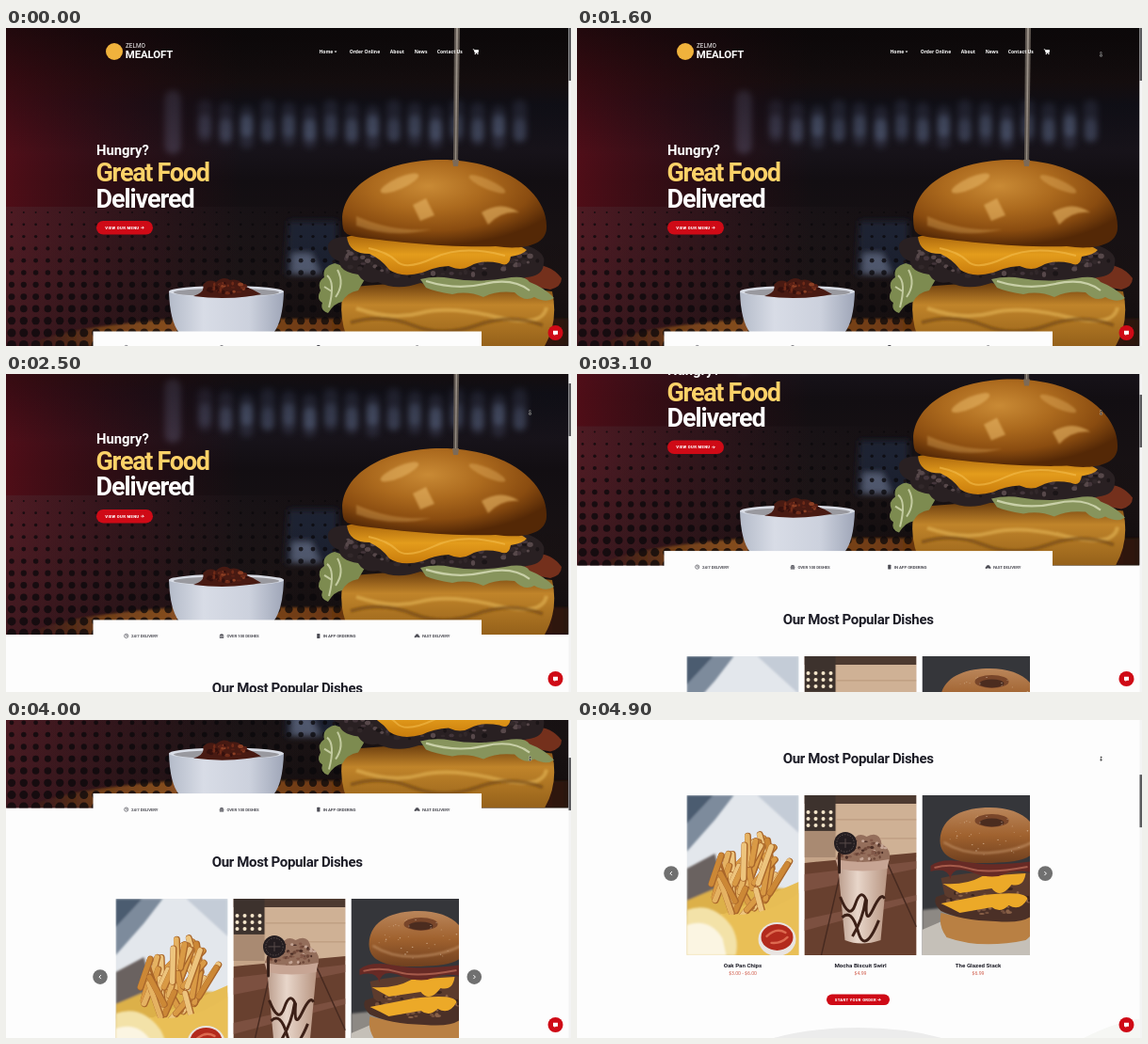
An HTML page that plays this animation: 600x338 px, repeating every 5000 ms.

```html
<!DOCTYPE html>
<html lang="en">
<head>
<meta charset="utf-8">
<title>Food delivery page</title>
<style>
html, body { margin: 0; width: 100%; height: 100%; overflow: hidden; background: #fdfdfd; }
svg { display: block; width: 100vw; height: 100vh; }
text { font-family: Roboto, Inter, sans-serif; font-weight: 700; }
.open { font-family: "Open Sans", "Noto Sans", sans-serif; }
.mid { text-anchor: middle; }
</style>
</head>
<body>
<svg viewBox="0 0 600 338">
<defs>
  <linearGradient id="wall" x2="0" y2="1">
    <stop offset="0" stop-color="#0e0a0b"/><stop offset=".17" stop-color="#1a1112"/>
    <stop offset=".24" stop-color="#11111a"/><stop offset=".38" stop-color="#17131a"/>
    <stop offset=".48" stop-color="#120e12"/><stop offset=".8" stop-color="#1a1314"/><stop offset="1" stop-color="#160f10"/>
  </linearGradient>
  <linearGradient id="glow">
    <stop offset="0" stop-color="#5e0d18" stop-opacity=".8"/><stop offset=".14" stop-color="#4c0c16" stop-opacity=".6"/>
    <stop offset=".42" stop-color="#3a0c14" stop-opacity="0"/>
  </linearGradient>
  <linearGradient id="shade" x2="0" y2="1">
    <stop offset="0" stop-color="#0a0708" stop-opacity=".65"/><stop offset=".4" stop-color="#0a0708" stop-opacity="0"/>
    <stop offset=".65" stop-color="#0a0708" stop-opacity="0"/><stop offset="1" stop-color="#0a0708" stop-opacity=".3"/>
  </linearGradient>
  <linearGradient id="haze">
    <stop offset="0" stop-color="#4d3a40" stop-opacity=".5"/><stop offset="1" stop-color="#30242a" stop-opacity="0"/>
  </linearGradient>
  <linearGradient id="wood">
    <stop offset="0" stop-color="#5a2f14" stop-opacity="0"/><stop offset=".14" stop-color="#6e3d18"/>
    <stop offset=".3" stop-color="#8a5122"/><stop offset=".55" stop-color="#6b3812"/><stop offset="1" stop-color="#2b150b"/>
  </linearGradient>
  <linearGradient id="bowl">
    <stop offset="0" stop-color="#b4bbc9"/><stop offset=".3" stop-color="#d8dce6"/><stop offset=".7" stop-color="#ccd1dd"/><stop offset="1" stop-color="#9fa6b8"/>
  </linearGradient>
  <radialGradient id="bun" cx=".42" cy=".3" r=".68">
    <stop offset="0" stop-color="#c98a35"/><stop offset=".4" stop-color="#ac6a1e"/>
    <stop offset=".75" stop-color="#8a4c10"/><stop offset="1" stop-color="#542806"/>
  </radialGradient>
  <linearGradient id="base" x2="0" y2="1">
    <stop offset="0" stop-color="#6b3d0e"/><stop offset=".35" stop-color="#c0842a"/><stop offset="1" stop-color="#95611a"/>
  </linearGradient>
  <linearGradient id="cheese" x2="0" y2="1">
    <stop offset="0" stop-color="#a8640c"/><stop offset=".5" stop-color="#e39c1c"/><stop offset="1" stop-color="#c97c0c"/>
  </linearGradient>
  <linearGradient id="glass">
    <stop offset="0" stop-color="#b99b8a"/><stop offset=".4" stop-color="#e8d6ca"/><stop offset="1" stop-color="#b6937f"/>
  </linearGradient>
  <linearGradient id="donut" x2="0" y2="1">
    <stop offset="0" stop-color="#ba865b"/><stop offset=".5" stop-color="#a0622f"/><stop offset="1" stop-color="#70401f"/>
  </linearGradient>
  <filter id="soft" x="-50%" y="-50%" width="200%" height="200%"><feGaussianBlur stdDeviation="3"/></filter>
  <filter id="soft1" x="-20%" y="-20%" width="140%" height="140%"><feGaussianBlur stdDeviation="1.2"/></filter>
  <clipPath id="heroClip"><rect width="597.5" height="338"/></clipPath>
  <clipPath id="card"><rect width="119" height="170"/></clipPath>
  <clipPath id="cardCut"><rect width="114.5" height="170"/></clipPath>
</defs>

<rect width="600" height="338" fill="#fdfdfd"/>
<g id="page">
  <g clip-path="url(#heroClip)">
    <rect width="598" height="338" fill="url(#wall)"/>
    <g id="bottles" fill="#7484a8" filter="url(#soft)"/>
    <g filter="url(#soft)">
      <path d="M300 205H352V262H296Z" fill="#1c2030"/>
      <path d="M304 240H324L334 262H303Z" fill="#7f8ca8" opacity=".6"/>
    </g>
    <rect width="598" height="338" fill="url(#glow)"/>
    <rect width="598" height="338" fill="url(#shade)"/>
    <rect y="190" width="360" height="148" fill="url(#haze)" opacity=".6"/>
    <path d="M20 338Q60 318 180 309H598V338Z" fill="url(#wood)" filter="url(#soft1)"/>
    <g id="dots" fill="#0a080b" opacity=".75"/>

    <path d="M173 280Q174 312 184 324Q234 334 284 324Q294 312 295 280Z" fill="url(#bowl)"/>
    <ellipse cx="234" cy="280" rx="61" ry="6" fill="#d9dde6"/>
    <ellipse cx="234" cy="281" rx="56" ry="4.4" fill="#99999f"/>
    <path d="M199 285Q212 281 209 273Q215 266 223 270Q231 263 238 268Q248 266 252 274Q262 277 271 283Q236 290 199 285Z" fill="#481a12"/>
    <g id="relish"/>

    <path d="M476 0H482L480 146H475Z" fill="#5d554f"/>
    <path d="M478 0H480L478 146H477Z" fill="#9b9289"/>
    <path d="M360 276Q350 305 366 338H572Q587 312 580 280Q470 264 360 276Z" fill="url(#base)"/>
    <g filter="url(#soft1)" fill="none" stroke-width="4">
      <path d="M372 298Q410 311 440 303T520 307T574 297" stroke="#e5b657" opacity=".6"/>
      <path d="M366 313Q400 303 432 316T500 316T570 316" stroke="#6e430f" opacity=".6"/>
    </g>
    <path d="M349 250Q335 254 338 265Q330 270 334 279Q329 288 336 292Q333 300 342 303Q349 292 357 291Q362 281 374 279L384 262Z" fill="#7d8b50"/>
    <path d="M341 263Q350 270 343 297M352 257Q360 272 350 286M338 275L346 280" stroke="#c3cba0" stroke-width="2" fill="none"/>
    <path d="M545 254Q575 246 590 266Q590 275 578 278L540 271Z" fill="#74301c"/>
    <path d="M342 235Q340 223 360 222Q450 215 552 231Q574 238 571 250Q571 263 553 265Q530 272 502 268Q470 279 440 271Q415 280 395 270Q380 273 374 262Q354 259 354 248Q343 244 342 235Z" fill="#292022"/>
    <g id="patty"/>
    <path d="M440 267Q456 263 472 266Q500 271 530 266Q551 262 556 270Q572 276 582 287Q574 293 561 286Q551 292 540 281Q520 279 507 286Q490 279 474 283Q455 280 446 276Z" fill="#87945c"/>
    <path d="M446 269Q478 279 508 272T556 279" fill="none" stroke="#c9d0a8" stroke-width="2.2"/>
    <path d="M362 222Q380 216 460 222Q535 222 553 236Q549 241 536 243Q534 255 524 250Q505 246 493 253Q483 259 470 253Q454 254 442 260Q420 266 407 257Q399 246 386 240Q364 240 362 222Z" fill="url(#cheese)"/>
    <path d="M385 234Q405 238 415 248T455 244T530 242" fill="none" stroke="#f3bd4c" stroke-width="2" opacity=".6"/>
    <path d="M358 213C350 171 398 140 462 140C531 140 576 176 574 213C573 232 546 236 520 232C470 234 400 226 372 222Q359 220 358 213Z" fill="url(#bun)"/>
    <g filter="url(#soft1)" fill="#eebd6c">
      <ellipse cx="418" cy="165" rx="22" ry="6" transform="rotate(-24 418 165)" opacity=".5"/>
      <ellipse cx="511" cy="166" rx="21" ry="5" transform="rotate(24 511 166)" opacity=".35"/>
      <path d="M432 188L446 181L455 199L440 205ZM505 196Q526 183 545 196Q526 194 512 209Z" opacity=".55"/>
      <path d="M372 200Q410 217 452 214Q410 224 372 210Z" opacity=".3"/>
    </g>
    <path d="M474 140L475 147H480L481 140Z" fill="#7c6a58"/>
  </g>

  <circle cx="115" cy="25" r="9" fill="#f0b23c"/>
  <g fill="#fff">
    <text x="127" y="21" font-size="6.4" style="font-weight:400">ZELMO</text>
    <text x="126.8" y="32" font-size="11.4" letter-spacing="-.1">MEALOFT</text>
    <g id="nav"></g>
    <path d="M348.6 24.6H351.4L350 26.2Z"/>
    <path d="M495.8 22.8H497.1L498 26.3H501.2L501.7 23.7H497.4" fill="none" stroke="#fff" stroke-width=".8"/>
    <path d="M497.4 23.6H501.8L501.2 26.2H498Z"/>
    <circle cx="498.3" cy="27.5" r=".7"/><circle cx="500.9" cy="27.5" r=".7"/>
    <text x="96" y="135" font-size="14.8">Hungry?</text>
    <g font-size="27">
      <text x="95.5" y="163" letter-spacing="-1.3" fill="#fcd268">Great Food</text>
      <text x="95.5" y="190.5" letter-spacing="-1.1">Delivered</text>
    </g>
  </g>
  <g id="buttons"></g>

  <rect x="92.5" y="322.5" width="412.5" height="30" fill="#fdfdfd"/>
  <g id="features" fill="#4d4d55"></g>
  <g fill="none" stroke="#4d4d55" stroke-width=".7">
    <circle cx="127.7" cy="339.5" r="2.1"/><path d="M127.7 338.2V339.6H128.8"/>
  </g>
  <g fill="#4d4d55">
    <path d="M226.8 339.2Q226.8 337.3 229 337.3T231.2 339.2ZM226.6 339.6H231.4V340.3H226.6ZM226.8 340.7H231.2V341.8H226.8Z"/>
    <rect x="330.2" y="337.1" width="3.2" height="4.9" rx=".5"/>
    <path d="M433.8 341.4V339.5L434.8 339L435.4 337.6H437.8L438.4 339L439.3 339.5V341.4H438.2V340.8H435V341.4Z"/>
  </g>

  <text class="mid" x="298.6" y="400" font-size="15" letter-spacing="-.35" fill="#1c1c26">Our Most Popular Dishes</text>

  <g transform="translate(116.5 434.3)" clip-path="url(#card)">
    <rect width="119" height="170" fill="#e3e7ec"/>
    <g filter="url(#soft1)">
      <path d="M0 0H50L30 26L0 60Z" fill="#7d8b9c"/>
      <path d="M0 0H28L0 30Z" fill="#4b5c70"/>
      <path d="M75 0H119V40Z" fill="#c4ccd7"/>
      <path d="M0 78L30 62L45 120L0 128Z" fill="#6a6260"/>
      <path d="M0 112L40 95L119 100V170H0Z" fill="#dcb04a"/>
    </g>
    <path d="M20 134Q60 118 119 92V170H62Z" fill="#e7bd55"/>
    <g id="fries" stroke-linecap="round"></g>
    <path d="M36 126Q80 132 119 104V170H50Z" fill="#e9bf56"/>
    <path d="M0 122Q28 112 48 140Q56 155 52 170H0Z" fill="#f3e2a8" filter="url(#soft1)"/>
    <path d="M0 138Q24 130 38 152L42 170H0Z" fill="#fbf5e2" filter="url(#soft1)"/>
    <ellipse cx="96" cy="153" rx="20" ry="18" fill="#e9e4e1"/>
    <ellipse cx="96" cy="151" rx="17" ry="14" fill="#b32a1d"/>
    <path d="M85 150Q95 140 105 146M90 157Q100 158 107 151" stroke="#dd6a50" stroke-width="2.4" fill="none" stroke-linecap="round"/>
  </g>

  <g transform="translate(241.5 434.3)" clip-path="url(#card)">
    <rect width="119" height="170" fill="#c5a488"/>
    <path d="M0 0H119V9H0Z" fill="#4d3a30"/>
    <path d="M34 9H119V66H34Z" fill="#cfb195"/>
    <path d="M34 26H119M34 46H119" stroke="#b8977b"/>
    <rect width="33" height="38" fill="#3d322d"/>
    <g id="lamps" fill="#f4e6cb"></g>
    <path d="M0 38H33V66H0Z" fill="#a98a72"/>
    <path d="M0 72L119 61V170H0Z" fill="#68402f"/>
    <path d="M0 84L119 70V78L0 102ZM0 132L119 106V112L0 144Z" fill="#7c5040"/>
    <path d="M18 170L40 75M119 140L88 72" stroke="#472a20" stroke-width="1.5"/>
    <path d="M35 68H89L81 154Q60 161 43 154Z" fill="url(#glass)"/>
    <path d="M38 108Q48 134 54 116T66 112Q64 140 73 121T85 110M40 130Q50 120 57 145T79 133M51 150Q62 132 65 111" fill="none" stroke="#3c2017" stroke-width="3"/>
    <path d="M33 70Q37 52 50 52Q55 38 66 44Q80 37 82 52Q93 57 90 70Q62 76 33 70Z" fill="#946e5b"/>
    <g id="cocoa"></g>
    <path d="M33 68Q62 74 90 68L88 78Q62 83 36 78Z" fill="#c7a594"/>
    <circle cx="43.5" cy="51" r="12" fill="#241d20"/>
    <circle cx="43.5" cy="51" r="9.2" fill="none" stroke="#5a4e4d" stroke-dasharray="1.5 1.5"/>
    <path d="M37 51H50M43.5 46V56" stroke="#574a49"/>
    <path d="M37 62V82" stroke="#37211b" stroke-width="3" stroke-linecap="round"/>
  </g>

  <g transform="translate(366.5 434.3)" clip-path="url(#cardCut)">
    <rect width="119" height="170" fill="#35363a"/>
    <path d="M0 122L119 110V170H0Z" fill="#8d8984" filter="url(#soft1)"/>
    <path d="M0 143L30 130L119 140V170H0Z" fill="#c5c0b8"/>
    <path d="M20 125Q62 137 119 126Q123 145 110 154Q62 164 26 151Q17 139 20 125Z" fill="#b98043"/>
    <path d="M15 108Q60 92 119 102V125Q112 137 78 134Q40 133 20 123Q11 115 15 108Z" fill="#4b3027"/>
    <path d="M20 88Q60 78 119 83V105Q112 116 78 115Q35 116 24 106Z" fill="#5c3b2d"/>
    <g id="stack"></g>
    <path d="M22 94Q46 96 64 86L110 83Q108 98 95 95Q83 111 74 99L40 104ZM20 115L66 106Q110 101 112 110Q104 124 92 117Q83 126 74 119L40 125Q31 120 20 115Z" fill="#eca928"/>
    <path d="M9 75Q20 66 48 71T119 70V83Q100 78 87 84T53 82T30 89Q27 76 9 81Z" fill="#672a25"/>
    <path d="M13 77Q31 72 50 78T112 76" stroke="#a65b4b" stroke-width="2" fill="none"/>
    <path d="M19 48C20 22 45 13 72 13C100 13 121 25 122 47C123 68 104 71 74 72C42 73 19 69 19 48Z" fill="url(#donut)"/>
    <path d="M23 50Q45 64 75 61T120 48" fill="none" stroke="#d2a377" stroke-width="2.2" opacity=".6" filter="url(#soft1)"/>
    <ellipse cx="74" cy="27" rx="18" ry="7" fill="#79462a"/>
    <ellipse cx="74" cy="29" rx="13" ry="4.3" fill="#4b2c1f"/>
    <g id="sugar" opacity=".55"></g>
  </g>

  <g fill="#707070"><circle cx="100" cy="517.5" r="7.8"/><circle cx="497.3" cy="517.5" r="7.8"/></g>
  <path d="M100.9 515.5L98.9 517.5L100.9 519.5M496.4 515.5L498.4 517.5L496.4 519.5" fill="none" stroke="#fff"/>
  <g id="dishes"></g>
  <path d="M203 694Q245 681.5 298 681.5T393 694Z" fill="#ececec"/>
  <path d="M535 694Q570 676 597.5 672V694Z" fill="#f6f7f4"/>
</g>

<rect x="597.5" width="2.5" height="338" fill="#f3f3f3"/>
<rect id="thumb" x="597.5" width="2.5" height="56" fill="#59595c"/>
<circle cx="583.5" cy="324" r="8" fill="#cf0a16"/>
<path d="M581 321.8H586V325.7H583.8L582.5 327V325.7H581Z" fill="#fff"/>
<g id="cursor" stroke-linecap="round">
  <g stroke="#fff" stroke-width="1.3" fill="#fff" opacity=".7"><circle cy="-1.6" r=".4"/><path d="M0 -.2V2M-1 1.2L0 2.2L1 1.2" fill="none"/></g>
  <g stroke="#222" stroke-width=".7" fill="#222"><circle cy="-1.6" r=".4"/><path d="M0 -.2V2M-1 1.2L0 2.2L1 1.2" fill="none"/></g>
</g>
</svg>
<script>
const LOOP = 5000, STEP = 100, SCROLL_AT = 2000, SPEED = 0.1222;
const $ = id => document.getElementById(id);
const fill = (id, markup) => { $(id).innerHTML = markup; };
const times = (n, f) => Array.from({ length: n }, (_, i) => f(i)).join('');

let seed = 7;
const rnd = (a = 0, b = 1) => {
  seed = (seed * 16807) % 2147483647;
  return a + (b - a) * seed / 2147483647;
};
const pick = list => list[Math.floor(rnd() * list.length)];

// Random specks inside an ellipse
const specks = (n, cx, cy, rx, ry, size, colors) => times(n, () => {
  const a = rnd(0, 6.283), d = Math.sqrt(rnd());
  return `<ellipse cx="${cx + rx * d * Math.cos(a)}" cy="${cy + ry * d * Math.sin(a)}" rx="${rnd(.4, 1) * size}" ry="${rnd(.3, .8) * size}" fill="${pick(colors)}"/>`;
});

const label = (x, y, size, str, attrs = '') =>
  `<text x="${x}" y="${y}" font-size="${size}" ${attrs}>${str}</text>`;

const button = (x, y, w, h, str) =>
  `<rect x="${x}" y="${y}" width="${w}" height="${h}" rx="${h / 2}" fill="#cf0a16"/>` +
  label(x + w / 2 - 2.6, y + h / 2 + 1.5, 4.2, str, 'class="mid" fill="#fff" letter-spacing=".3" style="font-weight:900"') +
  `<path transform="translate(${x + w - 12.8} ${y + h / 2})" d="M0 0H3M1.7 -1.4L3.1 0L1.7 1.4" fill="none" stroke="#fff" stroke-width=".8"/>`;

const blur = (x, y, w, h, opacity) =>
  `<rect x="${x - w / 2}" y="${y}" width="${w}" height="${h}" rx="${w / 2}" opacity="${opacity}"/>`;

// Out-of-focus bottles: a dim body with a brighter lower half
fill('bottles', blur(177, 66, 17, 68, .38) + times(16, i => {
  const x = 211 + i * 22.3;
  return blur(x, 76 + i % 3 * 3, 15, 46, .2) + blur(x, 92 + i % 2 * 4, 13, 24, .28 + i % 3 * .08);
}));

fill('dots', times(12, r => times(29, c =>
  `<circle cx="${6 + c * 12.8}" cy="${196 + r * 12.8}" r="${1 + r * .35}"/>`)));

fill('nav', [[332.5, 'Home'], [364.7, 'Order Online'], [407.8, 'About'], [433.7, 'News'], [457.8, 'Contact Us']]
  .map(([x, s]) => label(x, 26.9, 5, s, 'class="open"')).join(''));

fill('features', [[133, '24/7 DELIVERY'], [234.5, 'OVER 100 DISHES'], [336.8, 'IN APP ORDERING'], [442, 'FAST DELIVERY']]
  .map(([x, s]) => label(x, 341.1, 4.35, s, 'letter-spacing="-.1" style="font-weight:600"')).join(''));

fill('buttons', button(96, 205, 60, 14.5, 'VIEW OUR MENU') + button(265, 646, 67, 11.5, 'START YOUR ORDER'));

fill('dishes', [[176, 'Oak Pan Chips', '$3.00 - $6.00'], [301, 'Mocha Biscuit Swirl', '$4.99'], [426, 'The Glazed Stack', '$6.99']]
  .map(([x, name, price]) =>
    label(x, 617, 6.2, name, 'class="mid" fill="#1c1c26"') +
    label(x, 625.7, 5, price, 'class="mid open" fill="#cb4b38" style="font-weight:400"')).join(''));

fill('relish', specks(32, 235, 277, 22, 6, 3, ['#6f2a18', '#8c3f24', '#34100d', '#5a2015']));
fill('patty', specks(150, 456, 246, 109, 19, 3.6, ['#43353a', '#1b1517', '#57484a', '#32282a']));
fill('cocoa', specks(65, 62, 59, 26, 12, 2.3, ['#4a2d25', '#6c4638', '#c5a595', '#825848']));
fill('stack', specks(60, 70, 112, 44, 16, 3, ['#75503d', '#3c251e', '#8a6148']));
fill('sugar', specks(35, 72, 43, 44, 22, .9, ['#ead2b8']));
fill('lamps', times(12, i => `<circle cx="${4 + i % 4 * 8}" cy="${18 + Math.floor(i / 4) * 7}" r="2"/>`));

fill('fries', times(46, () => {
  const a = rnd(0, 6.283), d = Math.sqrt(rnd());
  const x = 68 + 38 * d * Math.cos(a), y = 87 + 31 * d * Math.sin(a);
  const tilt = (x - 68) * .5 + rnd(-25, 45), len = rnd(12, 21);
  const line = (dx, w, color) =>
    `<path d="M${dx} ${-len}V${len}" stroke="${color}" stroke-width="${w}"/>`;
  return `<g transform="translate(${x} ${y}) rotate(${tilt})">` +
    line(0, 7, '#a9662a') + line(-.6, 5.4, pick(['#d99a45', '#e5b262', '#cc8836', '#edc47d'])) + '</g>';
}));

function draw(ms) {
  const t = Math.floor(ms % LOOP / STEP) * STEP;
  const y = Math.max(0, t - SCROLL_AT) * SPEED;
  $('page').setAttribute('transform', `translate(0 ${-y})`);
  $('thumb').setAttribute('y', y * .164);
  const k = Math.min(1, Math.max(0, (t - 1200) / 600));
  $('cursor').setAttribute('transform', `translate(556.5 ${2 + 39 * k})`);
  $('cursor').setAttribute('visibility', t >= 1200 ? 'visible' : 'hidden');
}

const start = performance.now();
(function tick() {
  draw(performance.now() - start);
  requestAnimationFrame(tick);
})();
</script>
</body>
</html>
```
